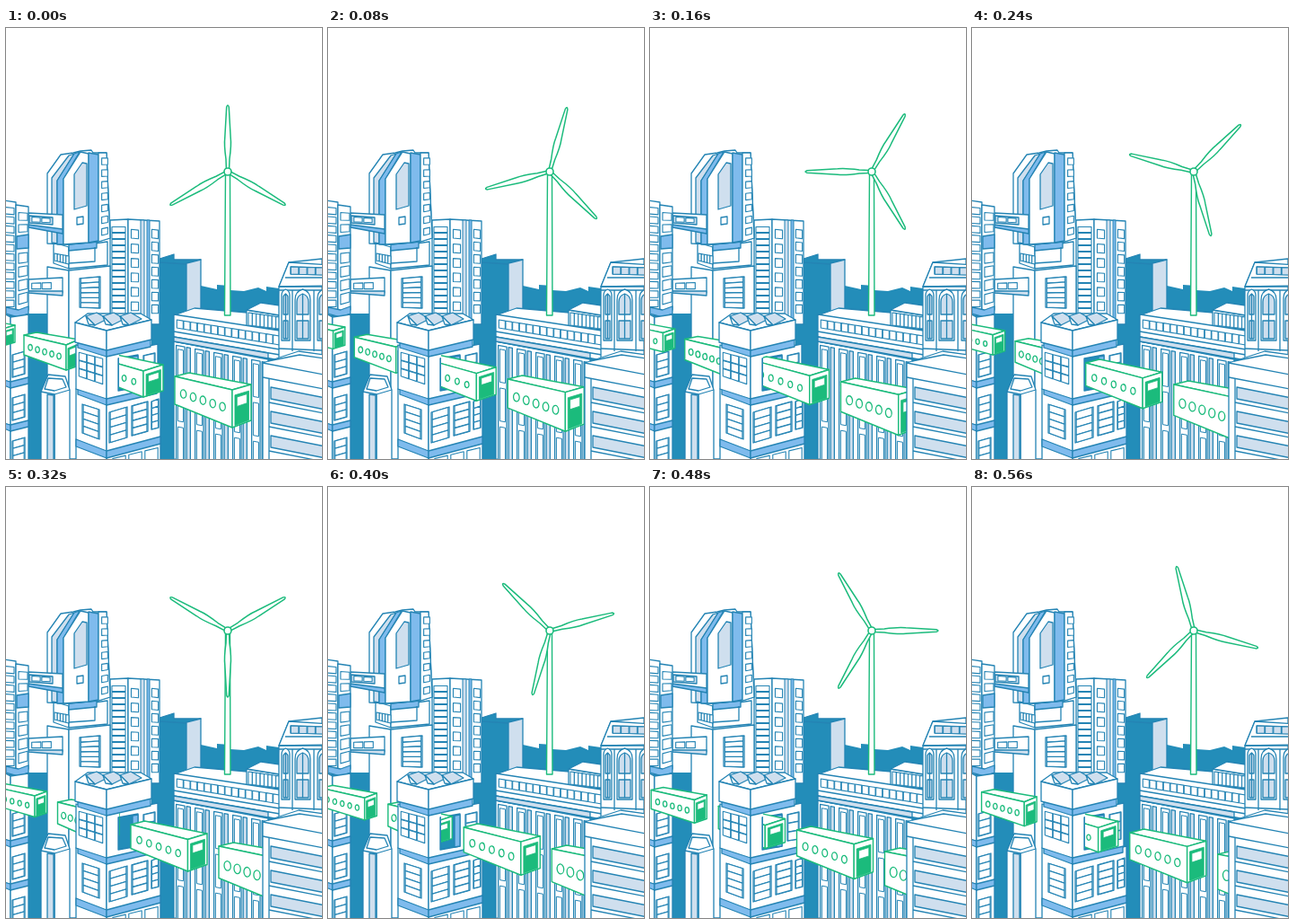
An HTML page with a canvas for the animation above (640 ms loop, 352x480 px).

```html
<!DOCTYPE html>
<html lang="en">
<head>
<meta charset="utf-8">
<title>City with wind turbine</title>
<style>
html, body { margin: 0; width: 100%; height: 100%; overflow: hidden; background: #fff; }
canvas { display: block; width: 352px; height: 480px; }
</style>
</head>
<body>
<canvas id="stage" width="352" height="480"></canvas>
<script>
const ctx = document.getElementById('stage').getContext('2d');
const STEP = 80, STEPS = 8;
const WHITE = '#fff', BLUE = '#2484b4', DEEP = '#238db9', PALE = '#cfdfee', SKY = '#7fbbed', GREEN = '#1bbb7c';
let ink = BLUE;

function shape(path, fill = WHITE, width = 1.3) {
  const p = new Path2D(path);
  if (fill) { ctx.fillStyle = fill; ctx.fill(p); }
  if (width) { ctx.strokeStyle = ink; ctx.lineWidth = width; ctx.stroke(p); }
}

const polygon = (points, fill, width) => shape('M' + points.map(p => p.join(' ')).join('L') + 'Z', fill, width);
const line = path => shape(path, null);
const mix = (a, b, k) => a + (b - a) * k;

// A wall has upright sides: left x, top, bottom, then right x, top, bottom.
function at([x0, t0, b0, x1, t1, b1], u, v) {
  return [mix(x0, x1, u), mix(mix(t0, t1, u), mix(b0, b1, u), v)];
}
function cell(w, u0, v0, u1, v1, fill, width) {
  polygon([at(w, u0, v0), at(w, u1, v0), at(w, u1, v1), at(w, u0, v1)], fill, width);
}
function wall(w, fill, width) { cell(w, 0, 0, 1, 1, fill, width); }
function panes(w, cols, rows, gapU = 0, gapV = 0, fill = WHITE, width = 1.1) {
  for (let i = 0; i < cols; i++) for (let j = 0; j < rows; j++)
    cell(w, (i + gapU) / cols, (j + gapV) / rows, (i + 1 - gapU) / cols, (j + 1 - gapV) / rows, fill, width);
}
function louvres(w, rows) { wall(w); panes(w, 1, rows, 0.06, 0.02); }

function skyline() {
  shape('M0 318H80V480H0ZM162 260H217V287L235 291V286L250 287V292L265 293L281 289L290 293V288L304 290V480H162Z', DEEP, 0);
  shape('M171 257L187 252V258L217 258L201 263L171 261Z', DEEP);
  wall([201, 262, 318, 217, 258, 318], PALE);
}

function slantedTower() {
  wall([46, 266, 387, 70, 270, 400]);
  wall([70, 270, 480, 116, 265, 480]);
  louvres([82, 279, 311, 105, 277, 312], 6);
  wall([53, 239, 262, 70, 244, 268]);
  wall([70, 244, 268, 113, 238, 264]);
  panes([54, 251, 259, 70, 254, 263], 5, 1);
  wall([70, 241, 248, 101, 238, 245], SKY);
  line('M70 262L99 260V244');
  shape('M46 162L61 141L75 139L83 137L95 136L97 139H112L116 234L103 238L70 241L46 240Z');
  shape('M51 167L70 142L76 140L57 170V240L51 239Z', PALE);
  shape('M57 170L76 140L82 138L64 168V241H57Z', SKY);
  shape('M64 168L83 138L92 140V239L64 241Z');
  shape('M92 139L103 141V237L92 239Z', SKY);
  shape('M103 139H112L116 234L103 238Z');
  panes([106, 142, 234, 114, 142, 232], 1, 7, 0.08, 0.22);
  shape('M76 163L85 150L90 151V198L76 202Z', PALE);
  shape('M79 211L86 210V218L79 219Z');
}

function officeTower() {
  wall([116, 214, 330, 136, 213, 330]);
  panes([118, 221, 319, 133, 221, 319], 1, 14, 0, 0.08);
  wall([136, 213, 330, 171, 215, 330]);
  panes([139, 221, 318, 148, 222, 318], 1, 6, 0.05, 0.2);
  wall([150, 214, 328, 154, 214, 328], PALE, 1);
  wall([157, 214, 328, 160, 214, 328], SKY, 1);
  panes([162, 222, 320, 170, 223, 320], 1, 7, 0.05, 0.16);
}

function leftBlocks() {
  shape('M25 206L63 208V229L51 224L25 221Z');
  wall([26, 209, 217, 52, 211, 219], PALE);
  panes([28, 210, 216, 50, 212, 217], 2, 1, 0.08, 0.05);
  wall([25, 219, 222, 63, 224, 229], SKY);
  wall([25, 280, 293, 63, 278, 295]);
  panes([28, 284, 291, 51, 283, 291], 2, 1, 0.06, 0.05);
  wall([25, 293, 295, 63, 293, 298], PALE);
  wall([-2, 192, 320, 11, 194, 320]);
  panes([-2, 198, 312, 9, 199, 312], 1, 11, 0, 0.14);
  wall([11, 197, 318, 25, 199, 314]);
  wall([12, 232, 246, 25, 230, 245], SKY);
  panes([14, 203, 230, 24, 204, 229], 1, 2, 0, 0.18);
  panes([14, 249, 310, 24, 248, 307], 1, 4, 0, 0.14);
  shape('M0 311L14 314L25 310V318L14 322L0 318Z', SKY);

  wall([-2, 318, 480, 5, 322, 490]);
  wall([5, 322, 490, 25, 319, 490]);
  for (const y of [360, 408, 456]) {
    louvres([7, y + 4, y + 29, 21, y, y + 25], 3);
    wall([-2, y + 32, y + 38, 5, y + 34, y + 41], SKY);
    wall([5, y + 34, y + 41, 25, y + 29, y + 36], SKY);
  }
}

function slimTower() {
  shape('M39 405L47 386L66 388L71 403V490H39Z');
  shape('M39 405L54 408V490H39Z');
  wall([46, 408, 490, 53, 409, 490], PALE);
  line('M54 408L71 403M54 408V480');
  shape('M47 390L63 391L67 400L54 404L43 402Z');
}

function turbineHall() {
  shape('M187 320L210 312L305 320V345L285 345Z');
  wall([268, 314, 332, 305, 320, 336]);
  shape('M268 314L284 306L305 309V320Z');
  panes([270, 317, 331, 305, 322, 335], 8, 1);
  const front = [187, 349, 480, 292, 369, 500];
  wall(front);
  for (let i = 0; i < 5; i++) {
    const u = i / 5;
    cell(front, u + 0.025, 0.03, u + 0.115, 1, WHITE);
    cell(front, u + 0.135, 0.03, u + 0.175, 1, PALE);
    for (let j = 0; j < 3; j++) cell(front, u + 0.042, 0.06 + j * 0.33, u + 0.1, 0.34 + j * 0.33, WHITE, 1);
  }
  wall([187, 319, 349, 305, 337, 370]);
  panes([190, 325, 334, 305, 343, 353], 15, 1, 0.04, 0);
  line('M187 338L305 358M187 344L305 364');
  wall([187, 344, 349, 292, 362, 368], PALE);
}

function archedHall() {
  shape('M304 288L315 261L352 257V400H304Z');
  shape('M304 288L315 261L360 264V287Z');
  wall([317, 266, 274, 354, 267, 275], PALE);
  panes([317, 266, 274, 354, 267, 275], 4, 1, 0.04, 0, PALE);
  line('M311 278H352M304 288H352M304 292H352M319 292V360M343 292V360');
  const arch = (x, y, w, h, fill) =>
    shape(`M${x} ${y + h}V${y + w * 0.7}Q${x} ${y + 2} ${x + w / 2} ${y}Q${x + w} ${y + 2} ${x + w} ${y + w * 0.7}V${y + h}Z`, fill);
  for (const [x, w] of [[307, 9], [322, 17], [347, 14]]) {
    arch(x, 291, w, 57);
    arch(x + 2, 296, w - 4, 23, PALE);
    shape(`M${x + 2} 326H${x + w - 2}V346H${x + 2}Z`, PALE);
    line(`M${x + w / 2} 296V346`);
  }
  line('M304 357L352 359');
}

function middleBlock() {
  wall([78, 402, 490, 112, 414, 490]);
  wall([112, 414, 490, 172, 400, 490]);
  louvres([85, 419, 451, 104, 425, 458], 4);
  louvres([115, 428, 462, 135, 422, 456], 4);
  louvres([140, 421, 454, 158, 416, 449], 4);
  louvres([162, 416, 447, 170, 413, 445], 4);
  wall([78, 458, 466, 112, 471, 479], SKY);
  wall([112, 471, 479, 172, 455, 463], SKY);
  panes([117, 480, 492, 171, 467, 490], 3, 1, 0.1, 0);

  wall([80, 400, 408, 112, 411, 420], SKY);
  wall([112, 411, 420, 168, 398, 407], SKY);
  wall([78, 353, 402, 112, 363, 413]);
  wall([112, 363, 413, 169, 352, 400]);
  panes([81, 361, 388, 108, 368, 397], 3, 3, 0.03, 0.03);
  wall([125, 368, 404, 147, 364, 400], DEEP);
  wall([141, 366, 401, 147, 365, 400], SKY);
  louvres([153, 365, 394, 166, 362, 392], 3);

  wall([80, 348, 356, 112, 357, 366], SKY);
  wall([112, 357, 366, 161, 346, 355], SKY);
  shape('M77 328L91 318H150L162 325L112 337Z');
  for (const x of [89, 108, 127]) {
    shape(`M${x} 321L${x + 12} 317L${x + 24} 324L${x + 10} 331Z`, PALE);
    shape(`M${x} 321L${x + 10} 331L${x + 3} 330Z`);
  }
  wall([77, 328, 350, 112, 337, 359]);
  wall([112, 337, 359, 162, 325, 347]);
}

function frontBlock() {
  shape('M286 373L326 360L354 364V490H286Z');
  line('M286 373L354 386M293 390V480M286 389L354 402M292 371L327 364L354 368');
  for (const y of [400, 427, 454]) {
    wall([295, y, y + 13, 356, y + 12, y + 25], PALE);
    line(`M293 ${y + 17}L354 ${y + 29}`);
  }
}

function turbine(angle) {
  ink = GREEN;
  shape('M244.5 162H249.5L250 320H243.5Z', WHITE, 1.4);
  for (let i = 0; i < 3; i++) {
    ctx.save();
    ctx.translate(247, 160);
    ctx.rotate((angle + i * 120) * Math.PI / 180);
    shape('M-1.6 -3L-2 -14Q-4.2 -30 -3.2 -38L-1.3 -72Q0 -76 1.3 -72L3.2 -38Q4.2 -30 2 -14L1.6 -3Z', WHITE, 1.5);
    ctx.restore();
  }
  shape('M251 160A4 4 0 1 1 243 160A4 4 0 1 1 251 160Z', WHITE, 1.6);
  ink = BLUE;
}

// Each track holds a car's side, front and far roof corner, 8 steps apart.
const farTrack = [
  { side: [-55, 324, 342, -3, 335, 354], nose: [10, 331, 350], roof: [-43, 321] },
  { side: [20, 342, 364, 67, 353, 381], nose: [81, 347, 376], roof: [34, 339] }
];
const nearTrack = [
  { side: [90, 364, 386, 153, 382, 411], nose: [175, 375, 404], roof: [105, 360] },
  { side: [188, 388, 419, 252, 403, 445], nose: [273, 397, 437], roof: [204, 384] }
];

function car([a, b], s) {
  const blend = key => a[key].map((n, i) => mix(n, b[key][i], s / STEPS));
  const side = blend('side'), nose = blend('nose'), roof = blend('roof');
  const front = [...side.slice(3), ...nose];
  ink = GREEN;
  polygon([at(side, 0, 0), roof, at(front, 1, 0), at(front, 0, 0)], WHITE, 1.4);
  wall(side, WHITE, 1.4);
  wall(front, WHITE, 1.4);
  cell(front, 0.14, 0.16, 0.88, 0.97, GREEN, 0.8);
  cell(front, 0.25, 0.23, 0.78, 0.48, WHITE, 0.8);
  const r = (side[2] - side[1]) * 0.15;
  for (let i = 0; i < 5; i++) {
    const [x, y] = at(side, 0.15 + i * 0.17, 0.53);
    ctx.beginPath();
    ctx.ellipse(x, y, r * 0.68, r, -0.1, 0, 7);
    ctx.lineWidth = 1.3;
    ctx.stroke();
  }
  ink = BLUE;
}

function draw(step) {
  ctx.fillStyle = WHITE;
  ctx.fillRect(0, 0, 352, 480);
  ctx.lineJoin = 'round';
  skyline();
  officeTower();
  slantedTower();
  leftBlocks();
  slimTower();
  turbineHall();
  archedHall();
  turbine(step * 15);
  for (const lap of [8, 0]) car(farTrack, step + lap);
  middleBlock();
  ctx.save();
  ctx.beginPath();
  ctx.rect(126, 340, 226, 140);
  ctx.clip();
  for (const lap of [-8, 0, 8]) car(nearTrack, step + lap);
  ctx.restore();
  frontBlock();
}

let shown = -1;
function tick() {
  const step = Math.floor(performance.now() / STEP) % STEPS;
  if (step !== shown) draw(shown = step);
  requestAnimationFrame(tick);
}
tick();
</script>
</body>
</html>
```
